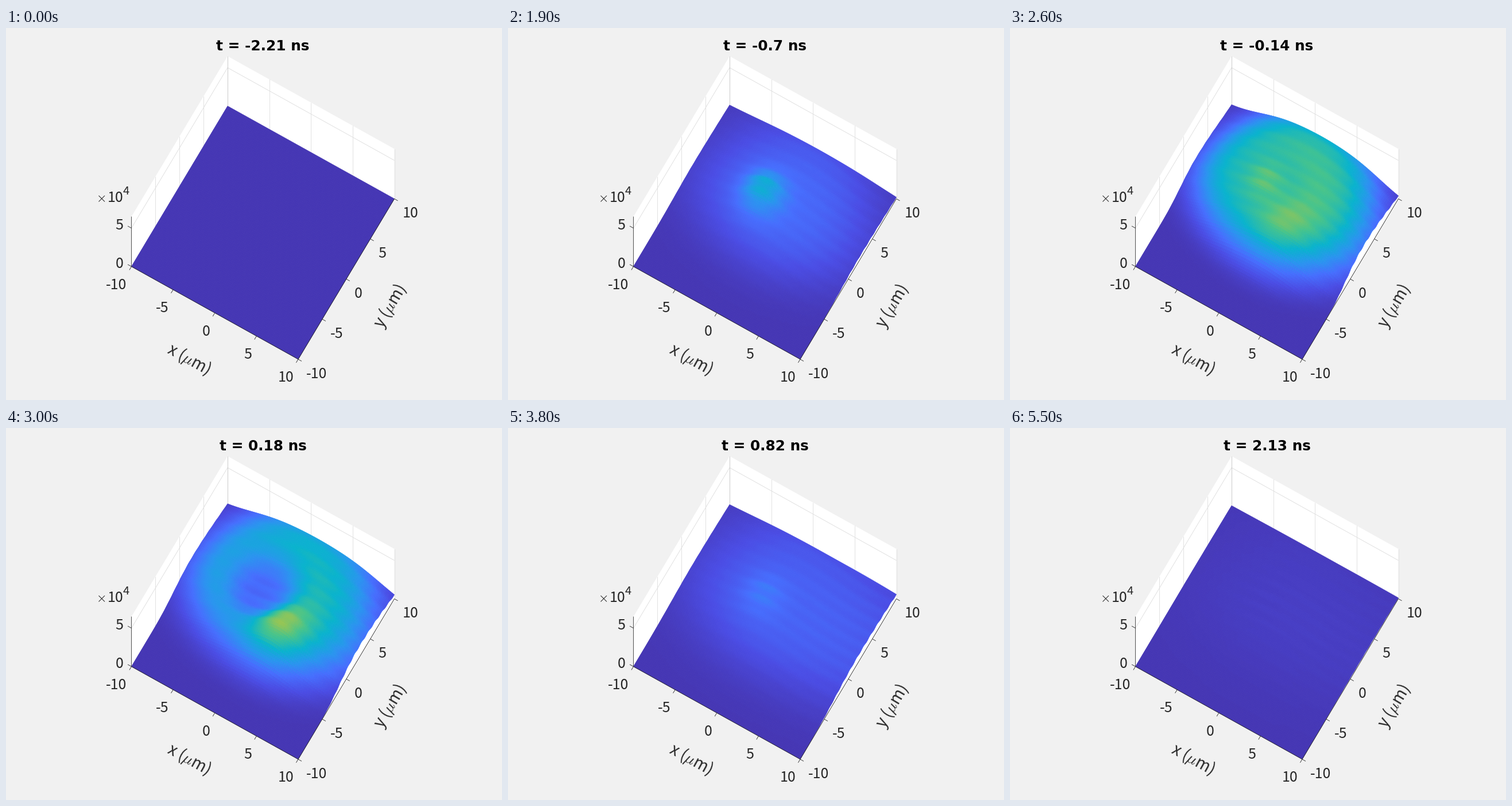
Write a matplotlib script that moves like this. It is 864 px wide and 648 px high and loops after 5600 ms.

```python
import numpy as np
import matplotlib.pyplot as plt
from matplotlib.animation import FuncAnimation
from matplotlib.collections import LineCollection, PolyCollection
from matplotlib.colors import LinearSegmentedColormap

W, H, DPI = 864, 648, 100
FRAMES, STEP_MS = 56, 100
N = 96
INK, GRID, BACK = "#262626", "#dfdfdf", "#f1f1f1"
FONT = "Noto Sans CJK JP"
plt.rcParams["mathtext.fontset"] = "cm"

# Oblique projection of the unit box; heights are in units of 1e4
ORIGIN = np.array([218.5, 415.5])
XVEC = np.array([290.5, 161.5])
YVEC = np.array([167.5, -279.5])
ZVEC = np.array([0, -13.38])
ZTOP, ZMAX = 6.5, 5.2

CMAP = LinearSegmentedColormap.from_list("sea", [
    "#4536b4", "#4a4ce4", "#466efe", "#2995ef", "#08b3cd",
    "#48c48a", "#b4c53f", "#fcc52f", "#f9fb15"])


def project(u, v, z=0.0):
    u, v, z = (np.asarray(a, float)[..., None] for a in (u, v, z))
    return ORIGIN + u * XVEC + v * YVEC + z * ZVEC


def bell(x, mid, width):
    return np.exp(-((x - mid) / width) ** 2)


# Rows run from the back edge to the front so nearer cells cover farther ones
U, V = np.meshgrid(np.linspace(0, 1, N + 1), np.linspace(1, 0, N + 1))
SPOT = 0.415, 0.63
REACH = np.hypot(U - SPOT[0], V - SPOT[1])
CORE = bell(REACH, 0, 0.115)
CREST = bell(np.hypot(U - 0.62, V - 0.47), 0, 0.15)
WAVE = np.sin(2 * np.pi * 14 * V + 0.9 * np.sin(9 * U)) * (0.3 + 0.7 * U ** 2 + CORE)


def swell(i, peak=27):
    """Fast build-up, then a long tail."""
    d = abs(i - peak)
    return np.exp(-(d / 8) ** 2.5) if i < peak else 1 / (1 + (d / 7.7) ** 2)


def height(i):
    level = swell(i)
    late = np.clip((i - 30) / 8, 0, 1)
    grow = 1 + 0.08 * np.clip((i - 23) / 7, 0, 1)
    du, dv = U - 0.54, V - 0.63
    su = np.where(du > 0, 0.47 + 0.35 * late, 0.50)
    sv = np.where(dv > 0, 0.50, 0.335)
    r = np.hypot(du / su, dv / sv) / grow

    # Wide mound, drained at the spot while the ring is out
    drain = 0.6 * bell(i, 30, 3.5) * np.exp(-(REACH / 0.19) ** 3)
    z = 3.25 * level * np.exp(-r ** (2 + 2.5 * level)) * (1 - drain)

    core = 1.75 * bell(i, 22, 5.5 if i < 22 else 4) + 0.45 * bell(i, 39, 4)
    z += core * CORE + 1.1 * bell(i, 30, 4) * CREST
    return np.maximum(z + 0.12 * WAVE * z / (z + 0.8), 0)


def cells(a):
    quad = [a[:-1, :-1], a[:-1, 1:], a[1:, 1:], a[1:, :-1]]
    return np.stack([c.reshape(N * N, *a.shape[2:]) for c in quad], axis=1)


fig = plt.figure(figsize=(W / DPI, H / DPI), dpi=DPI, facecolor=BACK)
ax = fig.add_axes([0, 0, 1, 1])
ax.set_xlim(0, W)
ax.set_ylim(H, 0)
ax.axis("off")


def label(x, y, s, px=25, **kw):
    kw = {"ha": "center", "va": "baseline", "color": INK, "family": FONT, **kw}
    return ax.text(x, y, s, fontsize=px * 72 / DPI, **kw)


def lines(segs, color, width, z):
    ax.add_collection(LineCollection(segs, colors=color, linewidths=width * 72 / DPI,
                                     zorder=z, capstyle="butt"))


def path(*pts):
    return np.array([project(*p) for p in pts])


# White floor and back walls
walls = [path((0, 0), (0, 1), (0, 1, ZTOP), (0, 0, ZTOP)),
         path((0, 1), (1, 1), (1, 1, ZTOP), (0, 1, ZTOP)),
         path((0, 0), (1, 0), (1, 1), (0, 1))]
ax.add_collection(PolyCollection(walls, facecolors="white", edgecolors="none", zorder=1))

grid = [path((0, 0, 5), (0, 1, 5), (1, 1, 5)), path((1, 1), (1, 1, ZTOP))]
for q in (0.25, 0.5, 0.75):
    grid += [path((0, q), (0, q, ZTOP)), path((q, 1), (q, 1, ZTOP))]
lines(grid, GRID, 0.9, 2)
lines([path((0, 1), (0, 1, ZTOP))], "#cbcbcb", 1, 2)

surface = PolyCollection([], linewidths=0.5, zorder=3)
ax.add_collection(surface)

# Axes, ticks and tick labels
axes = [path((0, 0, ZTOP), (0, 0), (1, 0), (1, 1))]
for val in range(-10, 11, 5):
    q = (val + 10) / 20
    a, b = project(q, 0), project(1, q)
    axes += [[a, a + (-3.6, 6)], [b, b + (6, 3.4)]]
    label(a[0] - 8, a[1] + 39.5, str(val), ha="right")
    label(b[0] + 14, b[1] + 33, str(val), ha="left")
for val in (0, 5):
    a = project(0, 0, val)
    axes.append([a, a + (-6.5, -3.6)])
    label(a[0] - 14, a[1] + 2, str(val), ha="right")
lines(axes, INK, 0.8, 4)

# Exponent and axis names
label(191, 303, "10")
label(209, 290, "4", 20)
lines([[(161.5, 292), (172, 302.5)], [(161.5, 302.5), (172, 292)]], INK, 1, 4)
for x, y, name, turn in ((319, 577, "x", -29), (669, 485, "y", 59)):
    label(x, y, name + r" ($\mu$m)", 28, rotation=turn, va="center",
          rotation_mode="anchor")

title = label(447.5, 39, "", 24.8, family="DejaVu Sans", weight="bold", color="black")


def draw(i):
    z = height(i)
    surface.set_verts(cells(project(U, V, z)))
    colors = CMAP(cells(z).mean(axis=1) / ZMAX)
    surface.set_facecolor(colors)
    surface.set_edgecolor(colors)
    t = np.interp(i, [0, 38, 55], [-2.214, 0.818, 2.13])
    title.set_text(f"t = {round(float(t), 2):g} ns")
    return surface, title


anim = FuncAnimation(fig, draw, frames=FRAMES, interval=STEP_MS, repeat=True,
                     repeat_delay=0, init_func=lambda: draw(0))
plt.show()
```
